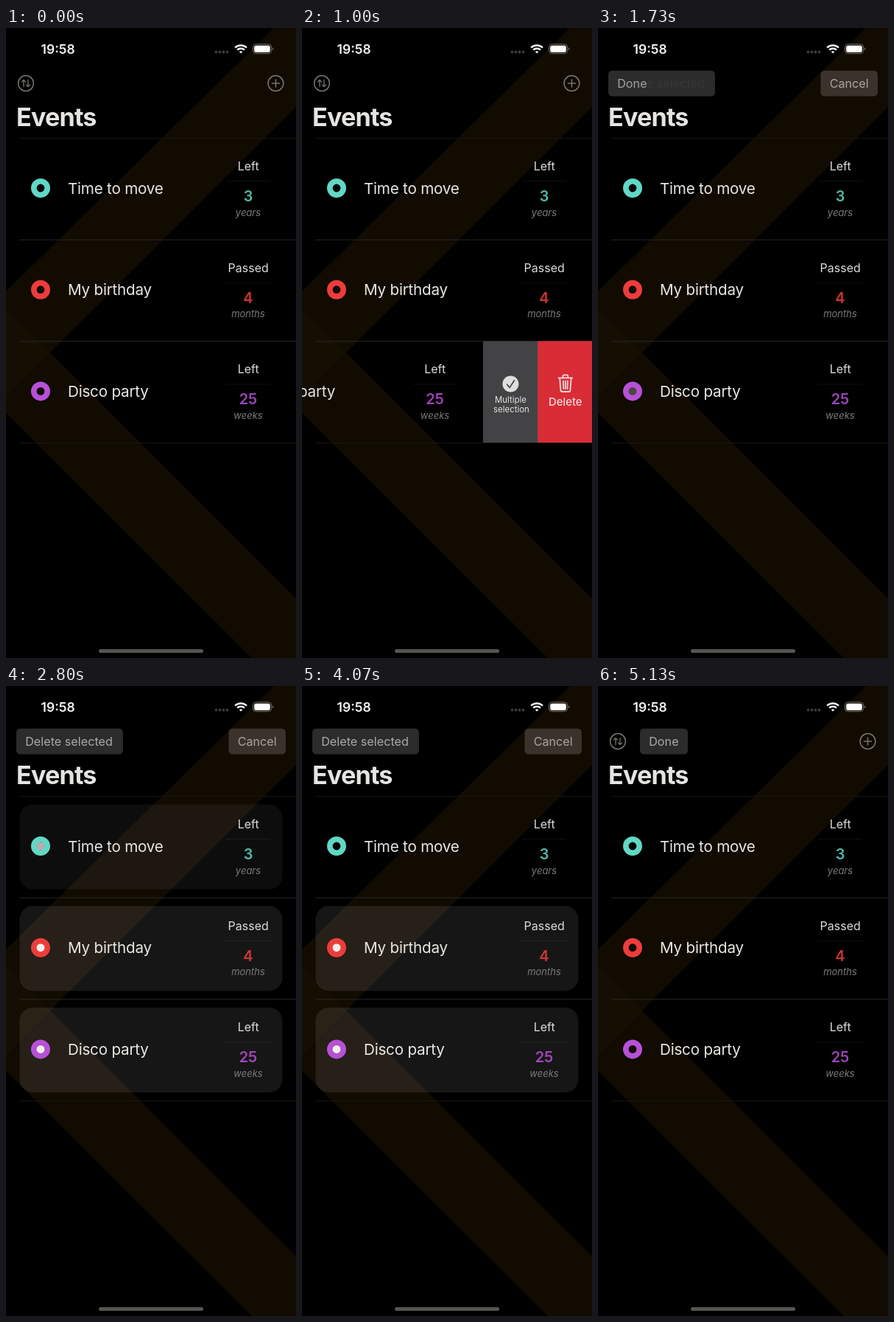
An HTML page for the animation above (5.2 s loop, 394 by 854 pixels).

```html
<!DOCTYPE html>
<html lang="en">
<head>
<meta charset="utf-8">
<style>
html, body { margin: 0; width: 100%; height: 100%; overflow: hidden; background: #000; }
svg { display: block; width: 394px; height: 854px; font-family: Inter, "Liberation Sans", sans-serif; font-size: 16px; }
.mid { text-anchor: middle; }
.line { fill: none; stroke-linecap: round; stroke-linejoin: round; }
</style>
</head>
<body>
<svg id="stage" viewBox="0 0 394 854">
  <path fill="#110b02" d="M0 357L364 0H394V107L60 440L394 773V854H334L0 522Z"/>
  <path fill="#150e02" d="M0 380L60 440L0 500Z"/>

  <!-- status bar -->
  <text x="47.6" y="34.8" font-size="17.5" font-weight="600" fill="#f4f4f4">19:58</text>
  <path class="line" d="M285.5 32.5h.01m5 0h.01m5 0h.01m5 0h.01" stroke="#3d3a36" stroke-width="3.8"/>
  <g class="line" stroke="#f6f6f6" stroke-width="2.5" style="stroke-linecap:butt">
    <path d="M311.2 26.6a11.4 11.4 0 0 1 15.8 0M314.2 29.7a7 7 0 0 1 9.8 0"/>
    <path d="M319.1 34.6l-2.2-2.3a3.2 3.2 0 0 1 4.4 0Z" fill="#f6f6f6" stroke="none"/>
  </g>
  <rect x="335.5" y="22" width="25" height="12.6" rx="4" fill="none" stroke="#77736e"/>
  <rect x="337.2" y="23.7" width="21.6" height="9.2" rx="2.6" fill="#fff"/>
  <path d="M362 26.3a2.2 2.2 0 0 1 0 4Z" fill="#77736e"/>

  <!-- toolbar -->
  <g class="line" stroke="#77736f" stroke-width="1.5">
    <g id="sort">
      <circle cx="27" cy="75" r="10.4"/>
      <path d="M24 79.5v-9m-2.6 2.6l2.6-2.6l2.6 2.6M30 70.5v9m-2.6-2.6l2.6 2.6l2.6-2.6" stroke-width="1.3"/>
    </g>
    <g id="plus">
      <circle cx="366.5" cy="75" r="10.4"/>
      <path d="M361.5 75h10m-5-5v10"/>
    </g>
  </g>
  <g id="cancel">
    <rect x="302.5" y="57.7" width="77.5" height="34.7" rx="5.2" fill="#3a322b"/>
    <text x="341.2" y="80.8" class="mid" font-size="16.2" fill="#aaa39d">Cancel</text>
  </g>
  <g id="action" font-size="16.2" fill="#aaa9a8">
    <rect id="pill" y="57.7" height="34.7" rx="5.2" fill="#2c2c2d"/>
    <text id="done" x="12.2" y="80.8">Done</text>
    <text id="remove" x="12.2" y="80.8">Delete selected</text>
  </g>

  <text x="14" y="133.2" font-size="34.2" font-weight="700" letter-spacing="-.025em" fill="#e6e4e2">Events</text>
  <g id="rows"></g>

  <!-- swipe buttons -->
  <g id="multi">
    <rect y="424.5" width="150" height="137.5" fill="#434345"/>
    <circle cx="37.4" cy="482.5" r="11" fill="#dededf"/>
    <path class="line" d="M32.6 483.2l3.5 4.2l6.4-9.6" stroke="#434345" stroke-width="1.7"/>
    <g class="mid" font-size="11.4" fill="#e2e2e2">
      <text x="37.4" y="508.4">Multiple</text>
      <text x="38.4" y="521.4">selection</text>
    </g>
  </g>
  <g id="trash">
    <rect y="424.5" width="150" height="137.5" fill="#d82c36"/>
    <g class="line" stroke="#f2d9da" stroke-width="1.8">
      <path d="M28.2 474.3h19M34.3 474v-2.2q0-1.4 1.4-1.4h4q1.4 0 1.4 1.4v2.2"/>
      <path d="M30 475l1.2 16.2q.2 1.8 2 1.8h9q1.8 0 2-1.8l1.2-16.2M34.7 478.5l.4 10.5M37.7 478.5v10.5M40.7 478.5l-.4 10.5"/>
    </g>
    <text x="37.5" y="511.5" class="mid" font-size="14.9" font-weight="500" fill="#f2dadb">Delete</text>
  </g>

  <rect x="126" y="842" width="142" height="5" rx="2.5" fill="#555450"/>
</svg>
<script>
const LOOP = 5200, STEP = 137.7;
const $ = id => document.getElementById(id);
const set = (el, key, value) => el.setAttribute(key, value);
const show = (el, alpha) => set(el, 'opacity', alpha);
const slide = (el, x) => set(el, 'transform', `translate(${x} 0)`);
const ease = (t, a, b) => {
  const k = Math.min(1, Math.max(0, (t - a) / (b - a)));
  return k * k * (3 - 2 * k);
};

// card and dot: [fade-in start, end, fade-out start, end]
const events = [
  { name: 'Time to move', state: 'Left', count: 3, unit: 'years', color: '#62d7c6',
    card: [2700, 2880, 3680, 3900], dot: [2690, 2860, 3620, 3790] },
  { name: 'My birthday', state: 'Passed', count: 4, unit: 'months', color: '#ed3d3b',
    card: [2265, 2450, 4110, 4310], dot: [2255, 2430, 4080, 4270] },
  { name: 'Disco party', state: 'Left', count: 25, unit: 'weeks', color: '#b850d8',
    card: [1720, 1930, 4600, 4790], dot: [1670, 1850, 4610, 4800] },
];
const rule = (y, color) => `<path d="M18 ${y}H394" stroke="${color}"/>`;

$('rows').innerHTML = rule(149.5, '#161412') + events.map((e, i) => `
  <g transform="translate(0 ${i * STEP})">
    <rect id="card${i}" x="18.5" y="160.5" width="357" height="115" rx="18" fill="#fff"/>
    <g id="row${i}">
      <circle cx="47" cy="217" r="9.2" fill="none" stroke="${e.color}" stroke-width="7.6"/>
      <circle id="dot${i}" cx="47" cy="217" r="5.5" fill="#f6efea"/>
      <text x="84" y="224.8" font-size="20.7" letter-spacing="-.012em" fill="#e9e6e3">${e.name}</text>
      <g class="mid">
        <text x="329.2" y="193" fill="#dedcda">${e.state}</text>
        <path d="M299 207.5h60" stroke="#fff" opacity=".06"/>
        <text x="329" y="235" font-size="20" font-weight="600" fill="${e.color}" opacity=".86">${e.count}</text>
        <text x="329" y="254.6" font-size="13" font-style="italic" fill="#7c7a78">${e.unit}</text>
      </g>
    </g>
    ${rule(287.1, i < 2 ? '#282725' : '#161412')}
  </g>`).join('');

function draw(t) {
  events.forEach((e, i) => {
    const level = span => ease(t, span[0], span[1]) - ease(t, span[2], span[3]);
    show($('card' + i), 0.087 * level(e.card));
    show($('dot' + i), level(e.dot));
  });

  const open = 148.5 * (ease(t, 250, 800) - ease(t, 1320, 1630));
  slide($('row2'), -open);
  slide($('multi'), 394.5 - open);
  slide($('trash'), 394.5 - open / 2);

  const editing = t >= 1665 && t < 4790;
  show($('sort'), editing ? 0 : 1);
  show($('plus'), editing ? 0 : 1);
  show($('cancel'), editing ? 1 : 0);

  const grow = ease(t, 1640, 1725), shrink = ease(t, 4790, 4870);
  const label = ease(t, 1690, 1930) - ease(t, 4610, 4790);
  show($('action'), t >= 1665 ? 1 : 0);
  slide($('action'), 14 + 43 * shrink);
  set($('pill'), 'width', 65 + 80 * (grow - shrink));
  show($('done'), 1 - label);
  show($('remove'), label);
}

const start = performance.now();
function frame() {
  draw((performance.now() - start) % LOOP);
  requestAnimationFrame(frame);
}
frame();
</script>
</body>
</html>
```
